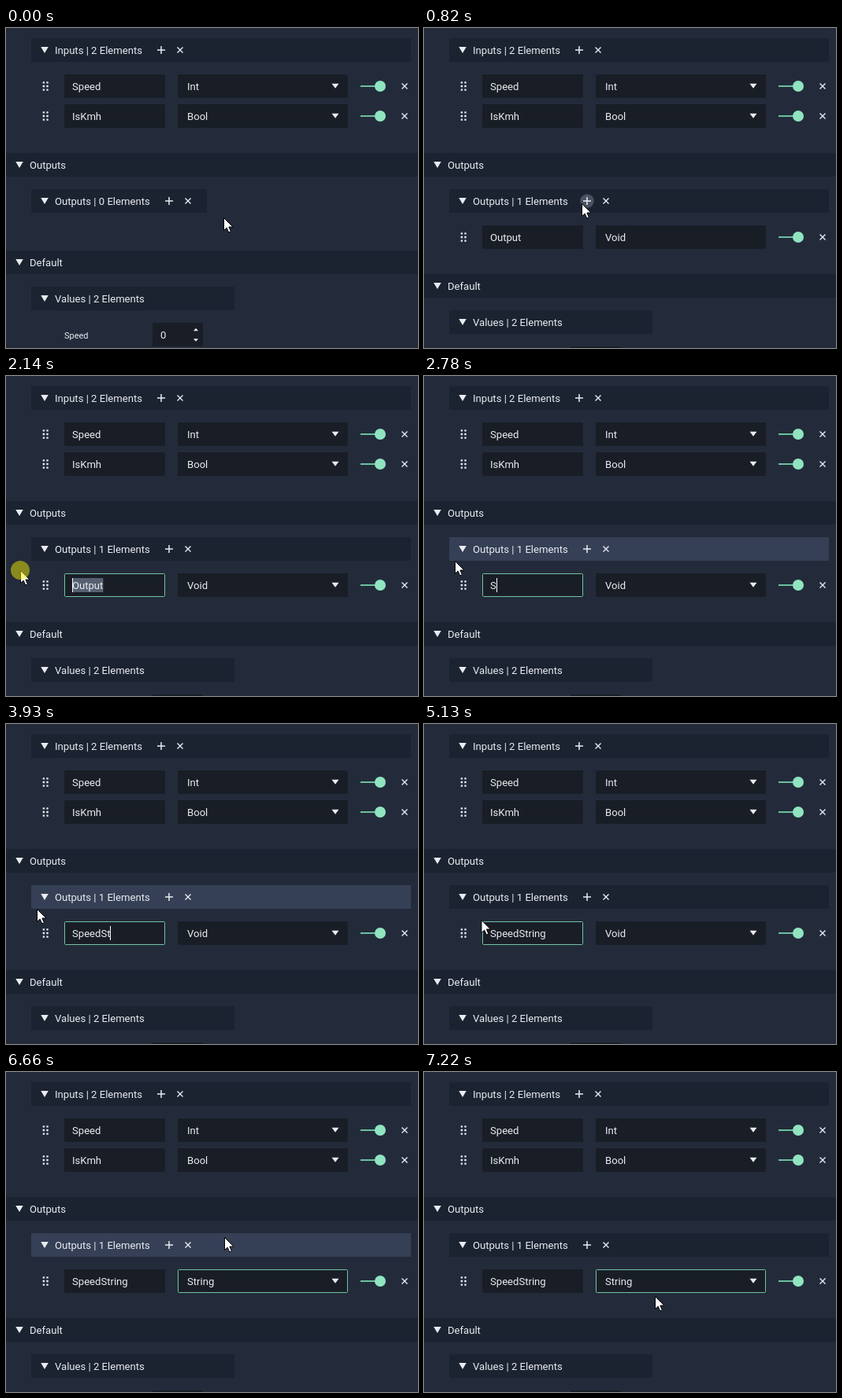
An HTML page that plays this animation: 523 px wide and 407 px high, repeating every 7720 ms.

```html
<!DOCTYPE html>
<html lang="en">
<head>
<meta charset="utf-8">
<title>Adding an output</title>
<style>
  html, body { margin: 0; width: 100%; height: 100%; overflow: hidden; background: #232b3b; }
  svg { display: block; width: 523px; height: 407px; }
  text { font-family: Roboto, Arial, sans-serif; font-size: 13.1px; fill: #e9ebef; white-space: pre; }
</style>
</head>
<body>
<svg id="stage" viewBox="0 0 523 407"></svg>
<script>
const LOOP = 7720;
const C = {
  bg: '#232b3b', bar: '#1b2331', field: '#191e26', hover: '#354056',
  ink: '#e9ebef', knob: '#90e4c0', line: '#6cc0a0', focus: '#72c3a3',
  select: '#566072', button: '#4a5160'
};
const stage = document.getElementById('stage');
const pen = document.createElement('canvas').getContext('2d');

function textWidth(s) {
  pen.font = '13.1px Roboto, Arial, sans-serif';
  return pen.measureText(s).width;
}

// Drawing helpers: cy is always the vertical centre of a line.
const rect = (x, y, w, h, fill, r = 0) =>
  `<rect x="${x}" y="${y}" width="${w}" height="${h}" rx="${r}" fill="${fill}"/>`;
const circle = (x, y, r, fill, opacity = 1) =>
  `<circle cx="${x}" cy="${y}" r="${r}" fill="${fill}" opacity="${opacity}"/>`;
const stroke = (d, color = C.ink, w = 1.5) =>
  `<path d="${d}" fill="none" stroke="${color}" stroke-width="${w}"/>`;
const label = (x, cy, s, size = 13.1) =>
  `<text x="${x}" y="${cy + size * 0.37}" style="font-size:${size}px">${s}</text>`;
const outline = (x, y, w, h) =>
  `<rect x="${x + .5}" y="${y + .5}" width="${w - 1}" height="${h - 1}" rx="1" fill="none" stroke="${C.focus}"/>`;
const triangle = (x, cy, w, h) =>
  `<path d="M${x - w / 2} ${cy - h / 2}h${w}l${-w / 2} ${h}z" fill="${C.ink}"/>`;
const plus = (x, y) => stroke(`M${x - 5} ${y}h10M${x} ${y - 5}v10`);
const cross = (x, y) => stroke(`M${x - 3.5} ${y - 3.5}l7 7m0 -7l-7 7`, C.ink, 1.4);

function section(cy, name) {
  return rect(0, cy - 15, 523, 30, C.bar) + triangle(17, cy, 9.5, 8) + label(30, cy, name);
}

function header(cy, name, width, fill = C.bar) {
  return rect(32, cy - 15, width, 30, fill, 1) + triangle(49, cy, 9.5, 8) + label(62, cy, name);
}

function handle(cy) {
  let dots = '';
  for (let i = 0; i < 6; i++)
    dots += rect(46.7 + (i % 2) * 4.6, cy - 5.8 + (i >> 1) * 4.6, 2.4, 2.4, C.ink, .5);
  return dots;
}

function row(cy, name, type, arrow = true) {
  return handle(cy) +
    rect(74, cy - 15, 128, 30, C.field, 1) + label(84, cy, name) +
    rect(218, cy - 15, 216, 30, C.field, 1) + label(230, cy, type) +
    (arrow ? triangle(418, cy - .2, 9, 6) : '') +
    rect(450, cy - 1, 22, 2, C.line) + circle(475, cy, 7, C.knob) + cross(506, cy);
}

// Pointer stops: time, x, y, and whether the move there eases in and out.
const stops = [
  [0, 276, 241], [480, 276, 241], [720, 200, 223, 1],
  [1270, 200, 223], [1510, 163, 253, 1],
  [1620, 163, 253], [1820, 127, 264, 1],
  [1870, 127, 264], [2140, 18, 247, 1],
  [2220, 18, 247], [2400, 39, 235, 1],
  [4910, 39, 235], [5130, 72, 249], [5600, 285, 275],
  [5760, 285, 275], [6050, 272, 228], [6280, 277, 210],
  [6850, 277, 210], [7220, 293, 285, 1], [LOOP, 293, 285]
];

function pointer(t) {
  const i = stops.findIndex((s, k) => k && t <= s[0]);
  const a = stops[i - 1], b = stops[i];
  let u = (t - a[0]) / (b[0] - a[0]);
  if (b[3]) u = u * u * (3 - 2 * u);
  return { x: a[1] + (b[1] - a[1]) * u, y: a[2] + (b[2] - a[2]) * u };
}

const between = (t, a, b) => t >= a && t < b;
const ADDED = 800, PRESS = 1850, OPEN = 5740, CLOSE = 6660;
const presses = [[735, ADDED], [PRESS, 2220], [5640, OPEN], [6510, CLOSE]];
const keys = [2780, 3060, 3190, 3320, 3520, 3750, 3930, 4070, 4210, 4440, 4590];
const types = ['Bool', 'Byte', 'Float', 'Int', 'String', 'Void'];

function nameField(t, name, p) {
  const cy = 266;
  let out = outline(74, 251, 128, 30);
  let caret = 84 + textWidth(name);
  if (t < keys[0]) {
    const end = 84 + textWidth(name);
    caret = Math.max(84, Math.min(end, p.x));
    out += rect(caret, 257, end - caret, 18, C.select) + label(84, cy, name);
  }
  if (t < 5050) out += rect(Math.round(caret), 257, 1, 18, '#fff');
  return out;
}

function popup(p) {
  let out = rect(218, 70, 216, 182, C.field);
  types.forEach((name, i) => {
    const top = 71 + i * 30;
    if (p.y >= top && p.y < top + 30) out += rect(219, top, 214, 30, C.hover);
    out += label(231, top + 15, name);
  });
  return out;
}

function outputs(t, p) {
  const added = t >= ADDED;
  const width = added ? 482 : 223;
  const onPlus = Math.hypot(p.x - 207, p.y - 220) < 10;
  const over = p.x >= 32 && p.x < 32 + width && p.y >= 205 && p.y <= 235.5;
  const lit = over && !onPlus && !between(t, OPEN, CLOSE);
  let out = header(220, `Outputs | ${added ? 1 : 0} Elements`, width, lit ? C.hover : C.bar);
  if (onPlus) out += circle(207, 220, 8.7, C.button);
  out += plus(207, 220) + cross(231, 220);
  if (!added) return out;

  const typed = keys.filter(k => t >= k).length;
  const name = typed ? 'SpeedString'.slice(0, typed) : 'Output';
  out += row(266, name, t < CLOSE ? 'Void' : 'String', t >= 850);
  if (between(t, PRESS, OPEN)) out += nameField(t, name, p);
  if (t >= CLOSE) out += outline(218, 251, 216, 30);
  return out;
}

function defaults(dy) {
  return section(298 + dy, 'Default') + header(344 + dy, 'Values | 2 Elements', 258) +
    label(74, 391 + dy, 'Speed', 11) + rect(186, 375 + dy, 64, 30, C.field, 1) +
    label(196, 390 + dy, '0') +
    triangle(241, 383.5 + dy, 6, -3.5) + triangle(241, 397 + dy, 6, 3.5);
}

function cursor(p) {
  return `<path transform="translate(${p.x + .5} ${p.y + .5})" fill="#fff" stroke="#000" stroke-width="1"
    d="M0 0V16L3.7 12.6L6.2 18.4L8.9 17.2L6.4 11.5H11.5Z"/>`;
}

function draw(t) {
  const p = pointer(t);
  let out = rect(0, 0, 523, 407, C.bg) +
    header(28, 'Inputs | 2 Elements', 482) + plus(197, 28) + cross(221, 28) +
    row(74, 'Speed', 'Int') + row(112, 'IsKmh', 'Bool') +
    section(174, 'Outputs') + outputs(t, p) + defaults(t < ADDED ? 0 : 30);
  if (between(t, OPEN, CLOSE)) out += popup(p);
  out += cursor(p);
  if (presses.some(([a, b]) => between(t, a, b))) out += circle(p.x, p.y, 12, '#f2ea00', .5);
  stage.innerHTML = out;
}

const start = performance.now();
function tick() {
  draw((performance.now() - start) % LOOP);
  requestAnimationFrame(tick);
}
tick();
</script>
</body>
</html>
```
